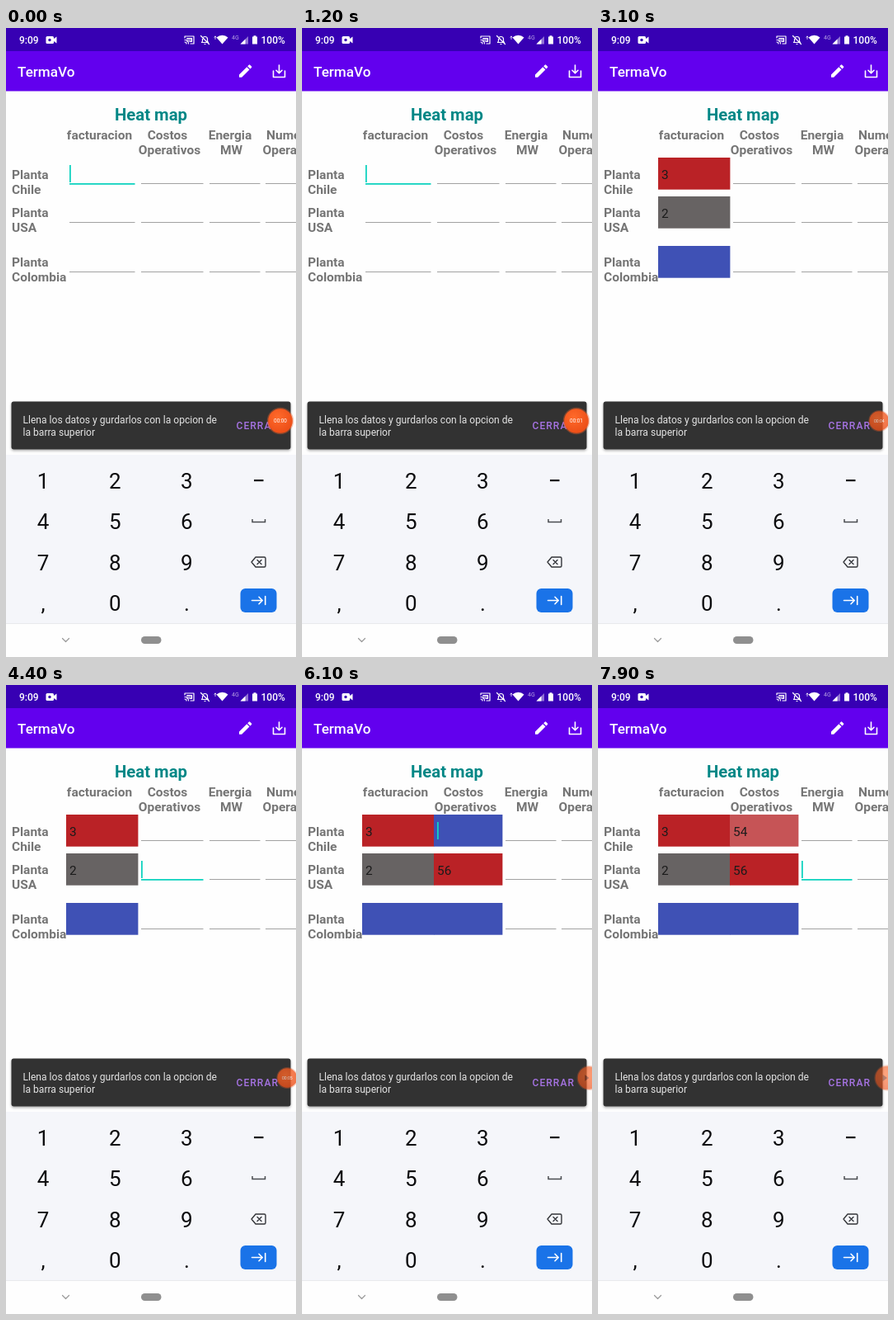
Write an HTML page that moves like this. It is 352 px wide and 762 px high and loops after 8000 ms.

```html
<!DOCTYPE html>
<html lang="es">
<head>
<meta charset="utf-8">
<title>TermaVo</title>
<style>
  html, body { margin: 0; width: 100%; height: 100%; overflow: hidden; background: #fefefe; }
  svg { display: block; width: 352px; height: 762px; font-family: Roboto, "Noto Sans", sans-serif; }
  .label { font-size: 15.5px; font-weight: 700; fill: #757575; }
  .mid { text-anchor: middle; }
  .value { font-size: 15.4px; fill: #1b1b1b; }
  .key { font-size: 26px; fill: #0c0c0e; text-anchor: middle; }
  .line { fill: none; stroke-linecap: round; stroke-linejoin: round; }
</style>
</head>
<body>
<svg viewBox="0 0 352 762">
  <defs>
    <radialGradient id="orange" cx=".4" cy=".35" r=".75">
      <stop offset="0" stop-color="#ff6a2b"/><stop offset="1" stop-color="#ea4a14"/>
    </radialGradient>
    <filter id="shadow" x="-10%" y="-20%" width="120%" height="150%">
      <feDropShadow dx="0" dy="1.5" stdDeviation="1.8" flood-opacity=".35"/>
    </filter>
  </defs>
  <rect width="352" height="762" fill="#fefefe"/>

  <!-- status bar -->
  <rect width="352" height="28" fill="#3700b3"/>
  <g fill="#fff">
    <text x="16" y="19" font-size="12" font-weight="500">9:09</text>
    <rect x="48.500" y="10" width="9.500" height="9" rx="1.500"/>
    <path d="M58 13l3.500-2.500v8L58 16z"/>
    <circle cx="53" cy="14.500" r="1.700" fill="#3700b3"/>
    <path d="M255.500 11.500a10.500 10.500 0 0 1 14 0l-7 8z"/>
    <path d="M284.500 19.500h9.500v-9.500z" opacity=".45"/>
    <path d="M284.500 19.500h6v-6z"/>
    <path d="M299 10.500h1.500v-1.300h3v1.300h1.500v9h-6z"/>
    <text x="274" y="13.500" font-size="7" opacity=".65">4G</text>
    <text x="309.500" y="19" font-size="12" font-weight="500">100%</text>
  </g>
  <rect x="219" y="12" width="7" height="5" fill="#fff" opacity=".5"/>
  <g class="line" stroke="#fff" stroke-width="1.200">
    <path d="M217 12v-2h11v9h-4M217 14.500a4.500 4.500 0 0 1 4.500 4.500M217 17a2 2 0 0 1 2 2M220 12.500h5.500v4h-2"/>
    <path d="M237.500 17.500h8l-1-1.500v-2.500a3 3 0 0 0-6 0v2.500zM241 19.500h1M236.500 9.500l10 10"/>
  </g>
  <path d="M254 10v3.500m-1-2.300l1-1.200 1 1.200" class="line" stroke="#fff" stroke-width=".8"/>

  <!-- app bar -->
  <rect y="28" width="352" height="48.500" fill="#6200ee"/>
  <text x="14" y="59" font-size="17.100" font-weight="500" fill="#fff">TermaVo</text>
  <path d="M283 56.500v3.200h3.200l9.300-9.300-3.200-3.200zM293.200 46.300l3.200 3.200 1.600-1.600q.7-.7 0-1.400l-1.800-1.800q-.7-.7-1.400 0z" fill="#fff"/>
  <path d="M324.500 52v7.500h14v-7.500M331.500 45v9.500M328 51.300l3.500 3.500 3.500-3.500" class="line" stroke="#fff" stroke-width="1.600"/>

  <text x="176" y="112" class="mid" font-size="20.300" font-weight="700" fill="#018786">Heat map</text>
  <g id="labels"></g>
  <g id="table"></g>

  <!-- keyboard -->
  <rect y="517" width="352" height="204" fill="#f5f6fa"/>
  <rect y="721" width="352" height="1" fill="#e9eaec"/>
  <g id="keys"></g>
  <rect x="301" y="547" width="11.500" height="2.200" fill="#0c0c0e"/>
  <path d="M299 595v3.500h15.500v-3.500" fill="none" stroke="#4a4c50" stroke-width="1.500"/>
  <path d="M303 641h10.500q1.500 0 1.500 1.500v9q0 1.500-1.500 1.500H303l-5-6zM305 644.500l5 5M310 644.500l-5 5" class="line" stroke="#333539" stroke-width="1.400"/>
  <rect x="284.500" y="679" width="44" height="29" rx="6" fill="#1a73e8"/>
  <path d="M298.500 693.500h12.500M307 689.300l4.200 4.200-4.200 4.200M314.700 688.500v10" class="line" stroke="#fff" stroke-width="1.600"/>
  <path d="M68.500 739.500l4 4 4-4" class="line" stroke="#9a9a9a" stroke-width="1.200"/>
  <rect x="164" y="737" width="24.500" height="9" rx="4.500" fill="#8f8f8f"/>

  <!-- snackbar -->
  <rect x="6.500" y="452.500" width="339" height="58" rx="3" fill="#323232" filter="url(#shadow)"/>
  <g font-size="12.100" fill="#e4e4e4">
    <text x="20.500" y="479">Llena los datos y gurdarlos con la opcion de</text>
    <text x="20.500" y="493.500">la barra superior</text>
    <text x="279.500" y="486" font-size="12" font-weight="500" letter-spacing="1.070" fill="#a673e3">CERRAR</text>
  </g>

  <g id="bubble">
    <circle r="16.200" fill="#e8602c" opacity=".4"/>
    <circle r="14.800" fill="url(#orange)"/>
    <text id="clock" y="2.300" class="mid" font-size="6.400" fill="#fff"></text>
    <path id="arrow" d="M-5.500-4v8l5.500-4z" fill="#8d2f14"/>
  </g>
</svg>
<script>
const LOOP = 8000;
const $ = id => document.getElementById(id);

function add(parent, tag, attrs, text = '') {
  const el = document.createElementNS('http://www.w3.org/2000/svg', tag);
  for (const k in attrs) el.setAttribute(k, attrs[k]);
  el.textContent = text;
  parent.append(el);
  return el;
}
const set = (el, attrs) => { for (const k in attrs) el.setAttribute(k, attrs[k]); };
const show = (el, on) => { el.style.display = on ? '' : 'none'; };

// Fixed labels
for (const [x, y, t] of [
  [113.5, 135, 'facturacion'], [196, 135, 'Costos'], [198.5, 153, 'Operativos'],
  [272, 135, 'Energia'], [273.5, 153, 'MW']
]) add($('labels'), 'text', { x, y, class: 'label mid' }, t);
for (const [x, y, t] of [
  [316, 135, 'Numero'], [311.5, 153, 'Operarios'],
  [7, 182.5, 'Planta'], [7, 200.5, 'Chile'], [7, 229, 'Planta'], [7, 247, 'USA'],
  [7, 289, 'Planta'], [7, 307, 'Colombia']
]) add($('labels'), 'text', { x, y, class: 'label' }, t);

['123', '456', '789', ',0.'].forEach((row, r) => [...row].forEach((c, i) =>
  add($('keys'), 'text', { x: 45 + i * 87.2, y: 557.5 + r * 49.6, class: 'key' }, c)));

// Table cells
const COLS = { A: [73, 87], B: [160, 83], C: [243, 69], D: [311, 87] };
const ROWS = [157, 204, 264];
const cells = [];
for (const col in COLS) ROWS.forEach((y, r) => {
  const [x, w] = COLS[col];
  cells.push({
    id: col + (r + 1), col, x, y, w,
    fill: add($('table'), 'rect', { x, y, width: w + .4, height: 38.7 }),
    line: add($('table'), 'rect', { x: x + 4, width: w - 7.5 }),
    text: add($('table'), 'text', { x: x + 4, y: y + 25.5, class: 'value' })
  });
});
const TEAL = '#12d3c0';
const caret = add($('table'), 'rect', { width: 1.8, height: 21, fill: TEAL });

// Time, focused cell, its text
const STEPS = [
  [0, 'A1', ''], [1300, 'A1', '3'], [1900, 'A2', ''], [2500, 'A2', '2'],
  [4000, 'B2', ''], [4700, 'B2', '5'], [5100, 'B2', '56'],
  [6000, 'B1', ''], [6500, 'B1', '5'], [7300, 'B1', '54'], [7800, 'C2', '']
];
// Share of the column maximum and its colour
const RAMP = [[1, '#ba2226'], [.9, '#c65456'], [.5, '#676363'], [.05, '#8088b3'], [0, '#3f51b5']];
const heat = share => RAMP.find(([min]) => share >= min)[1];

function drawTable(t) {
  const vals = {};
  let focus, since;
  for (const [at, id, text] of STEPS) if (at <= t) {
    vals[id] = text;
    focus = id;
    since = at;
  }
  for (const c of cells) {
    const max = Math.max(...[1, 2, 3].map(r => +(vals[c.col + r] || 0)));
    const text = vals[c.id] || '', active = c.id === focus;
    show(c.fill, max > 0);
    show(c.line, !max);
    if (max) c.fill.setAttribute('fill', heat(text / max));
    set(c.line, {
      y: c.y + 31, height: active ? 1.8 : 1,
      fill: active ? TEAL : '#a2a2a2'
    });
    c.text.textContent = text;
    if (active) set(caret, { x: c.x + 4 + text.length * 8.65, y: c.y + 9 });
  }
  show(caret, (t - since) % 1000 < 500);
}

// Time, x, scale, opacity
const BUBBLE = [
  [0, 333, 1, 1], [1400, 333, 1, 1], [1700, 341.3, .8, .78],
  [5900, 341.3, .8, .78], [6200, 351, .97, .6], [LOOP, 351, .97, .6]
];

function drawBubble(t) {
  const i = BUBBLE.findIndex(k => k[0] > t), a = BUBBLE[i - 1], b = BUBBLE[i];
  const p = (t - a[0]) / (b[0] - a[0]), e = p * p * (3 - 2 * p);
  const [x, s, o] = [1, 2, 3].map(n => a[n] + (b[n] - a[n]) * e);
  set($('bubble'), { transform: `translate(${x} 476) scale(${s})`, opacity: o });
  const docked = t >= 6050;
  show($('clock'), !docked);
  show($('arrow'), docked);
  // The recorder clock runs slightly ahead of playback
  $('clock').textContent = '00:0' + Math.floor((t * 1.08 + 670) / 1000);
}

function draw() {
  const t = performance.now() % LOOP;
  drawTable(t);
  drawBubble(t);
  requestAnimationFrame(draw);
}
draw();
</script>
</body>
</html>
```
